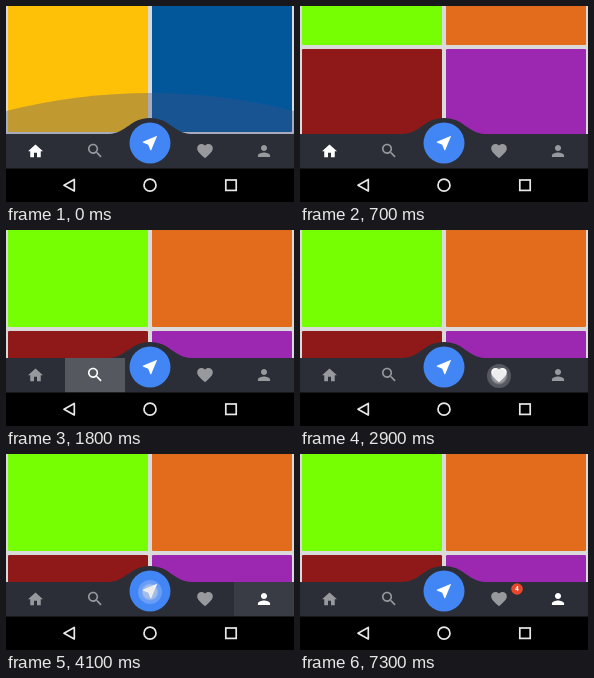
These frames come from a looping animation (288x196 px, 7400 ms). An HTML page:

```html
<!DOCTYPE html>
<html lang="en">
<head>
<meta charset="utf-8">
<title>Bottom navigation</title>
<style>
  html, body { margin: 0; width: 100%; height: 100%; overflow: hidden; background: #000; }
  svg { display: block; width: 100vw; height: 100vh; }
  text { font: 700 6.6px Roboto, sans-serif; fill: #fff; text-anchor: middle; }
</style>
</head>
<body>
<svg viewBox="0 0 288 196">
  <defs>
    <clipPath id="content"><rect width="288" height="128"/></clipPath>
    <clipPath id="search"><rect x="59" y="128" width="60" height="34.5"/></clipPath>
    <clipPath id="heart"><rect x="169" y="128" width="59" height="34.5"/></clipPath>
    <clipPath id="person"><rect x="228" y="128" width="60" height="34.5"/></clipPath>
    <clipPath id="send"><circle cx="144" cy="137" r="20.5"/></clipPath>
    <radialGradient id="soft">
      <stop offset=".72" stop-color="#dcdcdc"/>
      <stop offset="1" stop-color="#dcdcdc" stop-opacity="0"/>
    </radialGradient>
  </defs>
  <g clip-path="url(#content)">
    <rect width="288" height="128" fill="#dadada"/>
    <g id="grid"></g>
    <path id="glow" d="M0 105Q144 69 288 105V128H0Z" fill="#465082"/>
  </g>
  <path d="M0 128H103C121 127 124 112 144 112S167 127 185 128H288V163H0Z" fill="#2b2e37"/>
  <circle cx="144" cy="137" r="20.5" fill="#4285f4"/>
  <g id="ripples" fill="#fff"></g>
  <g id="icons"></g>
  <g id="badges"></g>
  <rect y="162.5" width="288" height="33.5"/>
  <g fill="none" stroke="#e8e8e8" stroke-width="1.7" stroke-linejoin="round">
    <path d="M68.3 173.5V185L58 179.2Z"/>
    <circle cx="144" cy="179.2" r="6"/>
    <rect x="219.8" y="174" width="10.4" height="10.4" stroke-linejoin="miter"/>
  </g>
  <circle id="touch" r="9" fill="url(#soft)"/>
</svg>
<script>
const LOOP = 7400, STEP = 100, CARD = 140, PITCH = 144;
const $ = id => document.getElementById(id);

function add(parent, tag, attrs) {
  const el = document.createElementNS('http://www.w3.org/2000/svg', tag);
  set(el, attrs);
  return parent.appendChild(el);
}
function set(el, attrs) {
  for (const key in attrs) el.setAttribute(key, attrs[key]);
}

// Linear interpolation through [time, value] pairs.
function track(keys, t) {
  const i = keys.findIndex(key => key[0] > t);
  if (i === 0) return keys[0][1];
  if (i < 0) return keys[keys.length - 1][1];
  const [t0, a] = keys[i - 1], [t1, b] = keys[i];
  return a + (b - a) * (t - t0) / (t1 - t0);
}

// Vertical place of the yellow row.
const scroll = [[300, -14], [400, -3], [500, 31.5], [600, 110], [700, 187], [800, 245]];
const glow = [[0, .34], [400, 0]];

const rows = [['#76ff03', '#e26b1c'], ['#8e1918', '#9c27b0'], ['#ffc107', '#02579b']];
rows.forEach((row, r) => row.forEach((fill, c) =>
  add($('grid'), 'rect', {
    x: 2 + 144 * c, y: (r - 2) * PITCH, width: CARD, height: CARD, rx: 1.3, fill
  })));

const icons = [
  { x: 29.5, y: 145.2, scale: .75, from: 0, to: 1500,
    d: 'M10 20v-6h4v6h5v-8h3L12 3 2 12h3v8z' },
  { x: 89, y: 144.8, scale: .78, from: 1500, to: 2900,
    d: 'M15.5 14h-.79l-.28-.27C15.41 12.59 16 11.11 16 9.5 16 5.91 13.09 3 9.5 3S3 5.91 3 9.5 5.91 16 9.5 16c1.61 0 3.09-.59 4.23-1.57l.27.28v.79l5 4.99L20.49 19l-4.99-5zm-6 0C7.01 14 5 11.99 5 9.5S7.01 5 9.5 5 14 7.01 14 9.5 11.99 14 9.5 14z' },
  { x: 144, y: 137, scale: .8, from: 0, to: LOOP,
    d: 'M21 3L3 10.53v.98l6.84 2.65L12.48 21h.98L21 3z' },
  { x: 199, y: 145, scale: .78, from: 2900, to: 3600,
    d: 'M12 21.35l-1.45-1.32C5.4 15.36 2 12.28 2 8.5 2 5.42 4.42 3 7.5 3c1.74 0 3.41.81 4.5 2.09C13.09 3.81 14.76 3 16.5 3 19.58 3 22 5.42 22 8.5c0 3.78-3.4 6.86-8.55 11.54L12 21.35z' },
  { x: 258, y: 145, scale: .76, from: 3600, to: LOOP,
    d: 'M12 12c2.21 0 4-1.79 4-4s-1.79-4-4-4-4 1.79-4 4 1.79 4 4 4zm0 2c-2.67 0-8 1.34-8 4v2h16v-2c0-2.66-5.33-4-8-4z' }
];
for (const icon of icons) {
  icon.el = add($('icons'), 'path', {
    d: icon.d,
    transform: `translate(${icon.x} ${icon.y}) scale(${icon.scale}) translate(-12 -12)`
  });
}

const ripples = [
  { clip: 'search', x: 89, y: 146, start: 1500 },
  { clip: 'heart', x: 199, y: 146, start: 2900 },
  { clip: 'person', x: 256, y: 147, start: 3600 },
  { clip: 'send', x: 144, y: 138, start: 4100 }
];
for (const ripple of ripples) {
  ripple.el = add($('ripples'), 'circle', {
    cx: ripple.x, cy: ripple.y, 'clip-path': `url(#${ripple.clip})`
  });
}

const touches = [
  { x: 155, y: 81.5, at: 800, alpha: .45 },
  { x: 89, y: 146, at: 1400, alpha: .5 },
  { x: 199, y: 146, at: 2900, alpha: .5 },
  { x: 256, y: 147, at: 3500, alpha: .65 },
  { x: 144, y: 138, at: 4100, alpha: .5 }
];

const badges = [
  { x: 107, label: '9+', fill: '#f9a32c',
    size: [[5100, 0], [5200, .4], [5300, .8], [5400, 1], [6900, 1], [7300, 0]] },
  { x: 217, label: '4', fill: '#e8472b',
    size: [[5100, 0], [5200, .4], [5300, .8], [5400, 1]] }
];
for (const badge of badges) {
  badge.el = add($('badges'), 'g', {});
  add(badge.el, 'circle', { r: 5.8, fill: badge.fill });
  add(badge.el, 'text', { y: 2.4 }).textContent = badge.label;
}

function render(t) {
  set($('grid'), { transform: `translate(0 ${track(scroll, t)})` });
  set($('glow'), { opacity: track(glow, t) });
  for (const { el, from, to } of icons) {
    set(el, { fill: t >= from && t < to ? '#fff' : '#98999d' });
  }
  for (const { el, start } of ripples) {
    const age = t - start;
    set(el, {
      r: Math.max(0, 12 + age * .1),
      opacity: age < 0 ? 0 : track([[300, .2], [600, 0]], age)
    });
  }
  const touch = touches.find(({ at }) => t >= at && t < at + STEP);
  set($('touch'), touch ? { cx: touch.x, cy: touch.y, opacity: touch.alpha } : { opacity: 0 });
  for (const { el, x, size } of badges) {
    set(el, { transform: `translate(${x} 135) scale(${track(size, t)})` });
  }
}

let begin;
function tick(now) {
  begin ??= now;
  const t = (now - begin) % LOOP;
  render(Math.floor(t / STEP) * STEP);
  requestAnimationFrame(tick);
}
render(0);
requestAnimationFrame(tick);
</script>
</body>
</html>
```
